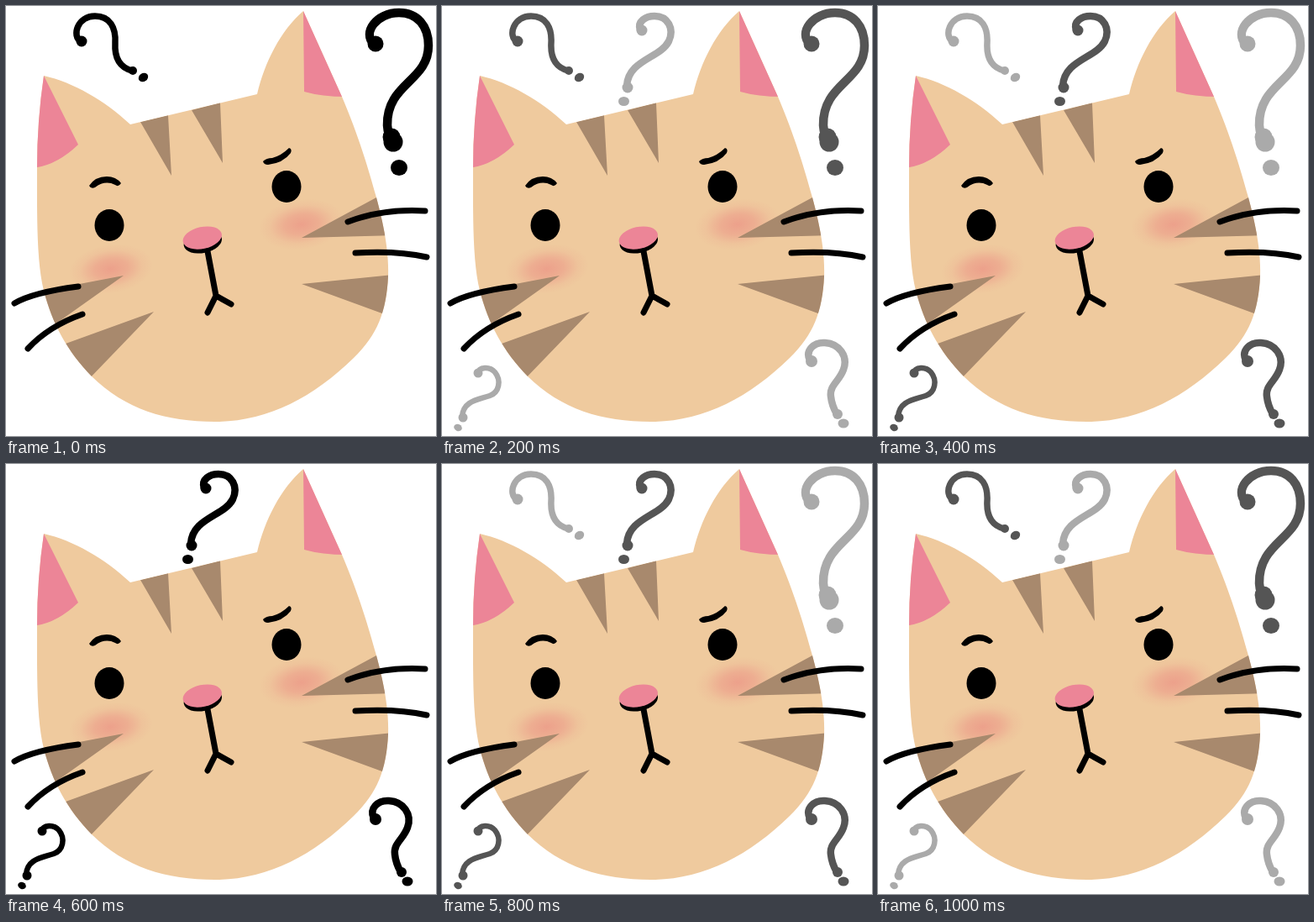
Recreate the animation shown at these times as an HTML page. Size 512 px wide and 512 px high, loop 1200 ms.

```html
<!DOCTYPE html>
<html lang="en">
<head>
<meta charset="utf-8">
<title>Puzzled cat</title>
<style>
  html, body { margin: 0; width: 100%; height: 100%; overflow: hidden; background: #fff; }
  svg { display: block; width: 100%; height: 100%; }
  .line { fill: none; stroke: #000; stroke-width: 7; stroke-linecap: round; stroke-linejoin: round; }
</style>
</head>
<body>
<svg viewBox="0 0 512 512">
  <defs>
    <path id="head" d="M45 83C80 91 117 112 148 141L299 105C308 67 327 29 354 6L400 108C420 155 431 192 441 228C451 265 456 295 455 322C453 364 442 392 414 419C365 467 310 495 249 495C190 495 142 480 102 441C73 411 55 378 45 339C36 303 37 245 37 192Q37 137 45 83Z"/>
    <clipPath id="inside"><use href="#head"/></clipPath>
    <radialGradient id="blush">
      <stop offset="0" stop-color="#ec9c89" stop-opacity=".9"/>
      <stop offset=".4" stop-color="#ec9c89" stop-opacity=".62"/>
      <stop offset=".75" stop-color="#ec9c89" stop-opacity=".15"/>
      <stop offset="1" stop-color="#ec9c89" stop-opacity="0"/>
    </radialGradient>
  </defs>

  <use href="#head" fill="#efca9e"/>
  <g clip-path="url(#inside)">
    <path fill="#ec8597" d="M45 83L86 165Q59 191 30 193V83ZM354 6L355 102Q376 108 405 108V6Z"/>
    <g fill="url(#blush)">
      <ellipse cx="125" cy="313" rx="50" ry="29" transform="rotate(-8 125 313)"/>
      <ellipse cx="352" cy="260" rx="51" ry="30" transform="rotate(-8 352 260)"/>
    </g>
    <path fill="#a8896d" d="M160 138L193 130L197 202ZM221 124L255 115L258 187ZM352 276L441 228L470 215V273ZM352 331L470 319V374ZM140 321L40 340V392ZM176 364L60 406L96 447Z"/>
  </g>

  <ellipse cx="123" cy="261" rx="17.5" ry="19"/>
  <ellipse cx="334" cy="215" rx="17.5" ry="19"/>
  <path d="M99 214Q106 203 120 203Q131 203 137 211Q134 216 130 213Q118 207 106 216Q101 218 99 214ZM306 185Q310 181 317 181Q328 178 337 169Q341 170 339 175Q330 187 312 189Q307 189 306 185Z"/>
  <g transform="rotate(-12 234 277)">
    <ellipse cx="233.500" cy="281" rx="23" ry="13"/>
    <ellipse cx="234" cy="276" rx="23.500" ry="13" fill="#ec8597"/>
  </g>
  <path class="line" d="M240 292L250 345L240 365M250 345L268 355"/>
  <path class="line" d="M10 354Q32 341 86 334M26 408Q51 381 91 367M407 257Q449 241 499 244M416 294Q466 291 501 299"/>

  <g id="outer"></g>
  <g id="inner"></g>
</svg>
<script>
const $ = id => document.getElementById(id);

// A hook with a blob at each end, and a dot [x, y, rx, ry, tilt]
function mark(group, path, width, blobs, [x, y, rx, ry, tilt]) {
  $(group).innerHTML += `<path class="line" style="stroke-width:${width}" d="${path}"/>` +
    blobs.map(([cx, cy, r]) => `<circle cx="${cx}" cy="${cy}" r="${r}"/>`).join("") +
    `<ellipse cx="${x}" cy="${y}" rx="${rx}" ry="${ry}" transform="rotate(${tilt} ${x} ${y})"/>`;
}

mark("outer", "M89 42C78 36 85 12 106 12C124 12 131 26 130 44C129 62 135 73 150 77", 7.5,
  [[90, 42, 6.5], [151, 77, 5]], [163.5, 85, 6, 5, -35]);
mark("outer", "M438 45C424 32 441 8 468 8C490 8 503 24 503 47C503 90 453 92 454 142Q455 155 460 163", 10.5,
  [[440, 45, 9.5], [461, 162, 11.5], [459, 156, 10.5]], [468, 192.5, 10, 9.5, 0]);
mark("inner", "M236 29C232 18 243 12 253 12C269 12 277 27 270 42C260 62 222 64 220 95", 8.5,
  [[238, 29, 6.5], [221, 97, 6.5]], [216.5, 113.5, 6.5, 5.5, 0]);
mark("inner", "M438 422C432 410 443 400 456 401C473 402 484 417 478 433C473 447 461 452 463 465Q464 475 470 486", 8.5,
  [[440, 423, 7], [471, 486, 6]], [478, 497, 6.5, 5.5, 0]);
mark("inner", "M42 438C44 429 57 429 63 436C71 446 68 460 57 464C43 469 25 470 24 489", 6.5,
  [[43, 437, 5.5], [25, 490, 5.5]], [19, 502, 5, 4, 25]);

function draw(now) {
  const step = Math.floor(now / 200) % 6;
  const fade = Math.abs(3 - step) / 3;
  $("outer").setAttribute("opacity", fade);
  $("inner").setAttribute("opacity", 1 - fade);
}

let start;
function tick(now) {
  start ??= now;
  draw(now - start);
  requestAnimationFrame(tick);
}
draw(0);
requestAnimationFrame(tick);
</script>
</body>
</html>
```
